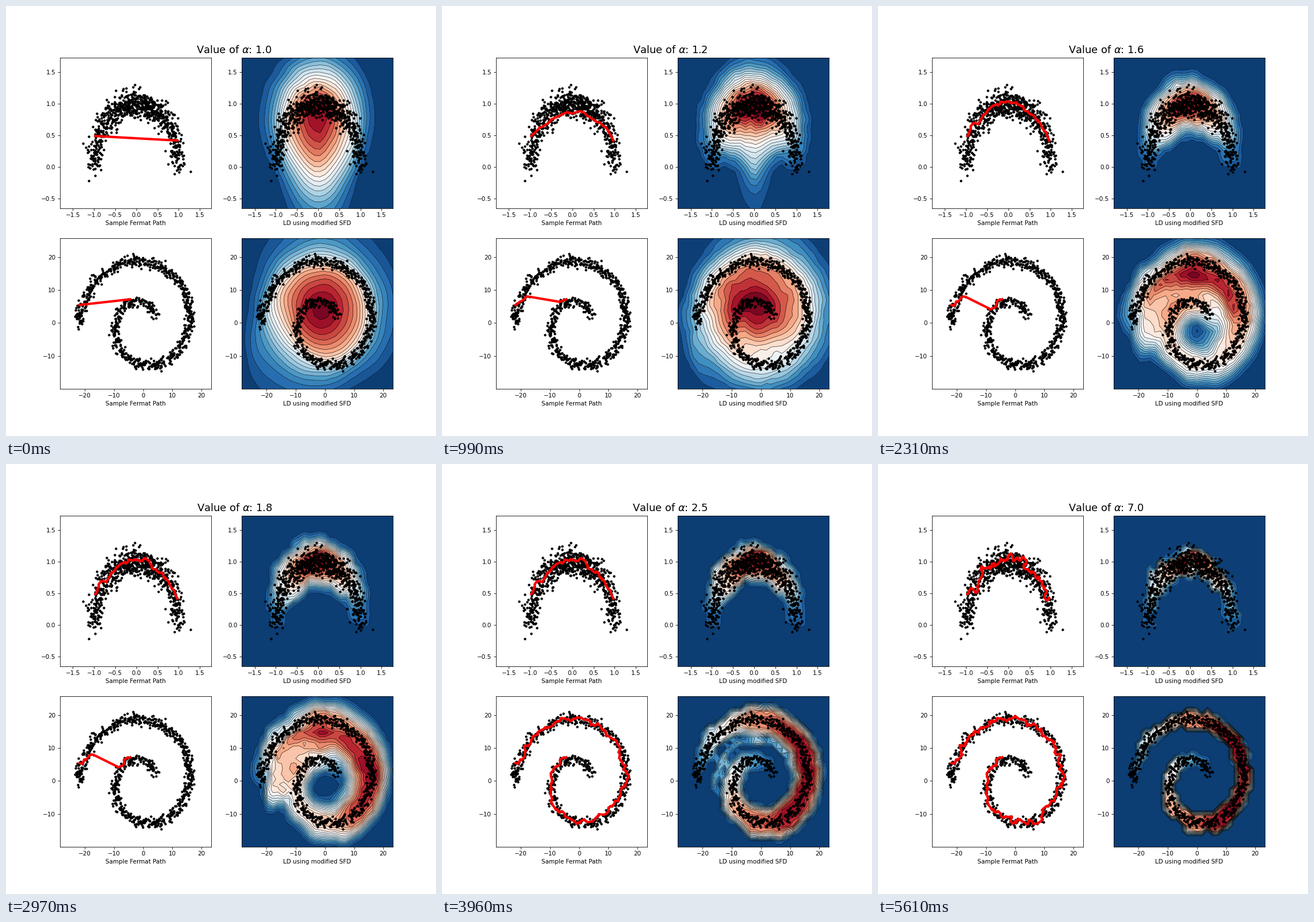
Write a matplotlib script that moves like this. It is 748 px wide and 748 px high and loops after 5940 ms.

```python
import numpy as np
import matplotlib.pyplot as plt
from matplotlib.animation import FuncAnimation

SIZE, INCHES = 748, 10
ALPHAS = [1.0, 1.05, *np.linspace(1.1, 2.0, 10).round(1), 2.5, 3.0, 4.0, 5.0, 6.0, 7.0]
GRAPH_SIZE, LANDMARKS, GRID, LEVELS = 500, 130, 30, 20
DENSITY_GAIN = 0.92  # the graph uses part of the sample, so its hops differ in length

rng = np.random.default_rng(11)


def spread(n):
    """Jittered golden-ratio sequence: every prefix covers the whole curve."""
    return (np.arange(n) * 0.6180339887 + rng.uniform(0, 0.05, n)) % 1


def make_arch(n=800):
    u = spread(n)
    theta = np.pi * (u + 0.065 * np.sin(2 * np.pi * u))
    return np.c_[np.cos(theta), np.sin(theta)] + rng.normal(0, 0.1, (n, 2))


def make_spiral(n=850):
    """Uniform in arc length along r = 3.15 + 2 phi."""
    area = 1.2 + 118 * spread(n)
    phi = np.sqrt(1.575 ** 2 + area) - 1.575
    r = 3.15 + 2 * phi
    return np.c_[r * np.cos(phi), r * np.sin(phi)] + rng.normal(0, 0.85, (n, 2))


def fermat_costs(a, b, alpha):
    gaps = np.hypot(*(a[:, None] - b[None]).transpose(2, 0, 1)).astype(np.float32)
    return gaps ** np.float32(1 + DENSITY_GAIN * (alpha - 1))


def geodesics(pts, alpha):
    """All-pairs sample Fermat distances (Floyd-Warshall)."""
    geo = fermat_costs(pts, pts, alpha)
    if alpha > 1:
        via = np.empty_like(geo)
        for k in range(len(pts)):
            np.add(geo[:, k, None], geo[k], out=via)
            np.minimum(geo, via, out=geo)
    return geo


def shortest_path(pts, geo):
    """Points lying on the geodesic from the first point to the second."""
    on_path = geo[0] + geo[1] <= geo[0, 1] * (1 + 1e-5)
    on_path[:2] = True
    index = np.flatnonzero(on_path)
    return pts[index[np.argsort(geo[0, index])]]


def lens_depth(pts, geo, nodes, alpha):
    """Share of landmark pairs whose lens contains each node."""
    hop = fermat_costs(pts, nodes, alpha)
    via = np.empty_like(hop)
    reach = np.empty((LANDMARKS, len(nodes)), np.float32)
    for i in range(LANDMARKS):
        np.add(hop, geo[:, i, None], out=via)
        via.min(axis=0, out=reach[i])
    depth = np.zeros(len(nodes))
    for i in range(LANDMARKS):
        depth += (np.maximum(reach[i], reach) < geo[i, :LANDMARKS, None]).sum(axis=0)
    return depth / (LANDMARKS * (LANDMARKS - 1))


class Row:
    """One data set: its Fermat path on the left, its depth map on the right."""

    def __init__(self, axes, sample, anchors, xlim, ylim):
        sample = np.vstack([anchors, sample])
        self.pts, self.map_ax = sample[:GRAPH_SIZE], axes[1]
        self.x, self.y = np.linspace(*xlim, GRID), np.linspace(*ylim, GRID)
        self.nodes = np.stack(np.meshgrid(self.x, self.y), axis=-1).reshape(-1, 2)
        self.cache, self.layers = {}, []
        for ax, label in zip(axes, ("Sample Fermat Path", "LD using modified SFD")):
            ax.scatter(*sample.T, s=10, c="black", zorder=3)
            ax.set(xlim=xlim, ylim=ylim, xlabel=label)
        self.line, = axes[0].plot([], [], color="red", lw=4, zorder=4)

    def solve(self, alpha):
        if alpha not in self.cache:
            geo = geodesics(self.pts, alpha)
            depth = lens_depth(self.pts, geo, self.nodes, alpha).reshape(GRID, GRID)
            self.cache[alpha] = shortest_path(self.pts, geo), depth
        return self.cache[alpha]

    def show(self, alpha):
        path, depth = self.solve(alpha)
        self.line.set_data(*path.T)
        for layer in self.layers:
            layer.remove()
        fill = self.map_ax.contourf(self.x, self.y, depth, LEVELS, cmap="RdBu_r")
        edges = self.map_ax.contour(self.x, self.y, depth, fill.levels[1:],
                                    colors="black", linewidths=0.5)
        self.layers = [fill, edges]


plt.rcParams["font.family"] = "DejaVu Sans"
fig, axs = plt.subplots(2, 2, figsize=(INCHES, INCHES), dpi=SIZE / INCHES)
title = fig.text(0.531, 0.89, "", fontsize="xx-large", ha="center", va="baseline")

# The first two anchors are the path's ends; the spiral's others flank its gap.
rows = [
    Row(axs[0], make_arch(), [(-0.97, 0.486), (0.966, 0.414)],
        (-1.81, 1.768), (-0.653, 1.725)),
    Row(axs[1], make_spiral(), [(-21.8, 5.5), (-4.5, 7.2), (-17.1, 8.0), (-9.7, 2.4)],
        (-28.6, 23.33), (-19.95, 25.77)),
]


def update(i):
    alpha = float(ALPHAS[i])
    title.set_text(rf"Value of $\alpha$: {alpha}")
    for row in rows:
        row.show(alpha)
    return []


anim = FuncAnimation(fig, update, frames=len(ALPHAS), interval=330, repeat=True,
                     repeat_delay=0, blit=False)
plt.show()
```
